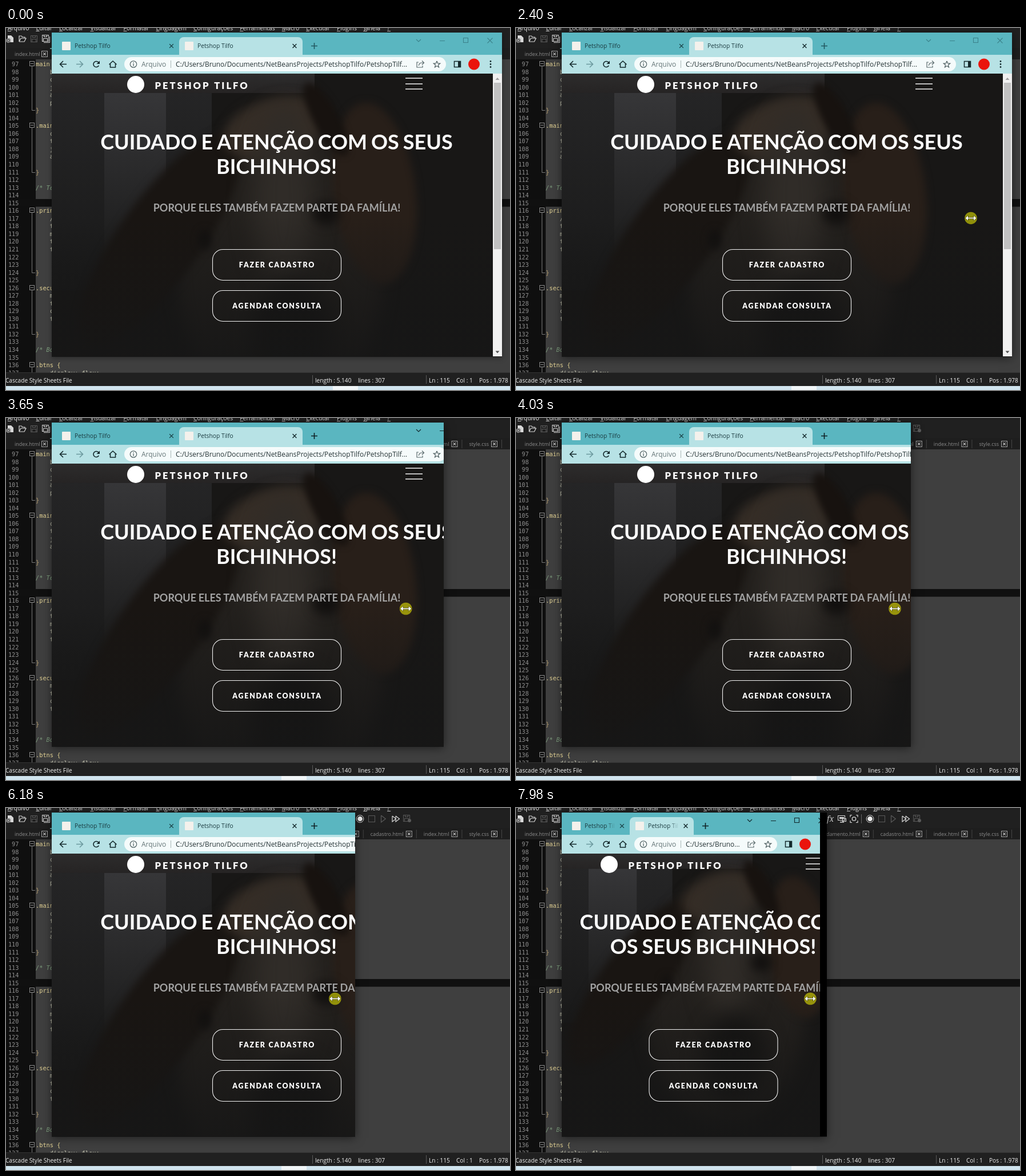
These frames come from a looping animation (882 by 635 pixels, 8000 ms). An HTML page with a canvas:

```html
<!DOCTYPE html>
<html lang="pt">
<head>
<meta charset="utf-8">
<title>Janela redimensionada</title>
<style>
html, body { margin: 0; width: 100%; height: 100%; overflow: hidden; background: #202020; }
canvas { display: block; }
</style>
</head>
<body>
<canvas id="stage" width="882" height="635"></canvas>
<script>
const W = 882, H = 635, LOOP = 8000, STEP = 80;
const CLICK = 1660, ACTIVE = 2470, RELAYOUT = 7600;
const UI = '"Open Sans", "Noto Sans", sans-serif';
const MONO = '"DejaVu Sans Mono", monospace';
const LATO = 'Lato, sans-serif';
let g = document.getElementById('stage').getContext('2d');

// ---------- motion ----------
const ramp = (t, a, b) => Math.min(1, Math.max(0, (t - a) / (b - a)));

// the drag slows down, pauses, then goes on
const DRAG = [[CLICK, 870], [2400, 796], [3280, 729], [4000, 663], [4960, 604], [6960, 557], [7920, 515]];
function dragX(t) {
  return DRAG.reduce((x, [b, v], i) => {
    const [a, u] = DRAG[Math.max(0, i - 1)];
    return i && t > a ? u + (v - u) * ramp(t, a, b) : x;
  }, DRAG[0][1]);
}
// the window border follows in four bursts
function edgeX(t) {
  return Math.round(868 - 177 * ramp(t, 3290, 3830) - 80 * ramp(t, 4600, 4950)
    - 53 * ramp(t, 6260, 6710) - 14 * ramp(t, 7200, 7920));
}
// black strip not painted yet
function stripW(t) {
  if (t < 3290) return Math.round(59 * ramp(t, 2860, 3280));
  return Math.round(12 * ramp(t, RELAYOUT, 7920));
}

// ---------- helpers ----------
function rect(x, y, w, h, c) { g.fillStyle = c; g.fillRect(x, y, w, h); }
function text(s, x, y, font, c, spacing = 0, align = 'left') {
  g.font = font; g.fillStyle = c; g.textAlign = align;
  g.letterSpacing = spacing + 'px';
  g.fillText(s, x, y);
}
function width(s, font) { g.font = font; g.letterSpacing = '0px'; return g.measureText(s).width; }
function line(c, w, ...runs) {
  g.strokeStyle = c; g.lineWidth = w;
  g.beginPath();
  for (const p of runs)
    for (let i = 0; i < p.length; i += 2) i ? g.lineTo(p[i], p[i + 1]) : g.moveTo(p[i], p[i + 1]);
  g.stroke();
}
function box(x, y, w, h, c, lw = 1) { g.strokeStyle = c; g.lineWidth = lw; g.strokeRect(x, y, w, h); }
function disc(x, y, r, c) { g.fillStyle = c; g.beginPath(); g.arc(x, y, r, 0, 7); g.fill(); }
function ring(x, y, r, c, lw = 1, a = 0, b = 7) {
  g.strokeStyle = c; g.lineWidth = lw; g.beginPath(); g.arc(x, y, r, a, b); g.stroke();
}
function poly(c, ...p) {
  g.fillStyle = c; g.beginPath();
  for (let i = 0; i < p.length; i += 2) g.lineTo(p[i], p[i + 1]);
  g.closePath(); g.fill();
}
function pill(x, y, w, h, r, c) { g.fillStyle = c; g.beginPath(); g.roundRect(x, y, w, h, r); g.fill(); }
function cross(x, y, r, c, w) { line(c, w, [x - r, y - r, x + r, y + r], [x + r, y - r, x - r, y + r]); }
function triangle(x, y, r, c) { line(c, 1.2, [x, y - r, x, y + r, x + r * 1.3, y, x, y - r]); }
function layer(draw) {
  const c = document.createElement('canvas'), keep = g;
  c.width = W; c.height = H;
  g = c.getContext('2d');
  draw();
  g = keep;
  return c;
}

// ---------- editor ----------
const MENU = 'Arquivo Editar Localizar Visualizar Formatar Linguagem Configurações Ferramentas Macro Executar Plugins Janela ?';
const TABS = ['agendamento.html', 'cadastro.html', 'index.html', 'style.css'];
const FIRST = 97, ROW = 13.54;
const CODE = `main {
    b
    c
    j
    a
    p
}

.main {
    c
    t
    j
    a

}

/* Textos */


.principal {
    /
    t
    m
    t
    t


}

.secundario {
    m
    t
    c
    t

}

/* Botoes */

.btns {
    display: flex;`.split('\n');

function floppy(x, y, c) {
  box(x - 5.5, y - 5.5, 11, 11, c);
  box(x - 2.5, y - 5.5, 5, 3, c);
  box(x - 3.5, y + .5, 7, 5, c);
}
function drawToolbar() {
  const ic = '#d8d8d8', dim = '#595959';
  poly(ic, 3, 13, 9, 13, 13, 17, 13, 25, 3, 25);
  disc(4, 22, 4, '#202020'); ring(4, 22, 3.3, ic); line(ic, 1, [2, 22, 6, 22], [4, 20, 4, 24]);
  line(ic, 1.2, [23, 24, 23, 14, 27, 14, 29, 16, 33, 16, 33, 18], [23, 24, 26, 18, 35, 18, 32, 24, 23, 24]);
  floppy(49, 19, dim);
  floppy(69, 18, ic); line(ic, 1, [66, 25.5, 76.5, 25.5, 76.5, 15]);
  text('fx', 544, 24, 'italic 14px "Noto Serif", serif', ic);
  box(563.5, 13.5, 12, 8, ic); rect(566, 16, 8, 3, ic); rect(567, 24, 7, 1.5, ic); box(571.5, 18.5, 6, 5, ic);
  ring(591.5, 19, 3.2, ic, 1.3);
  for (const sx of [-1, 1]) for (const sy of [-1, 1]) {
    const x = 591.5 + 6.5 * sx, y = 19 + 6.5 * sy;
    line(ic, 1.2, [x, y - 3.5 * sy, x, y, x - 3 * sx, y]);
  }
  rect(604, 11, 1, 16, '#666');
  ring(619.5, 19, 6.4, ic); disc(619.5, 19, 4.3, '#f0f0f0');
  box(634.5, 13.5, 11, 11, dim);
  triangle(656.5, 19, 6, dim);
  triangle(676, 19, 5, ic); triangle(682, 19, 5, ic);
  floppy(701, 18, dim); disc(706, 22, 3, dim);
}
function tabLabel(s, x, close) {
  text(s, x, 49, '9px ' + UI, '#8b8b8b');
  box(close - 4.5, 40.5, 10, 10, '#a5a5a5');
  cross(close + .5, 45.5, 2.3, '#c8c8c8', 1.2);
}
function drawTabs() {
  rect(0, 35, W, 20, '#1e1e1e');
  tabLabel('index.html', 15, 67);
  rect(77, 35, 80, 2, '#65a5a0');
  let x = 880;
  for (const s of [...TABS].reverse()) {
    const close = x - 26;
    rect(close + 13, 38, 1, 15, '#444');
    x = close - 9 - width(s, '9px ' + UI);
    tabLabel(s, x, close);
  }
}
function drawCode() {
  rect(0, 55, W, 549, '#3f3f3f');
  rect(0, 55, 52, 549, '#0f0f0f');
  rect(0, 300, W, 13.5, '#101010');
  const mono = '10.3px ' + MONO;
  let fold = 0;
  CODE.forEach((s, i) => {
    const y = 63 + i * ROW, mid = Math.round(y);
    text(FIRST + i, 22.5, y + 4, mono, '#8f8f8f', 0, 'right');
    const note = s.startsWith('/*');
    const c = note ? '#7f9f7f' : s === '}' ? '#b9a070' : s[0] === ' ' ? '#c9c9b4' : '#e6d596';
    text(s, 52, y + 4, (note ? 'italic ' : '') + mono, c);
    if (s.endsWith('{')) {
      fold = mid;
      box(41.5, mid - 4.5, 8, 8, '#8c8c8c');
      line('#8c8c8c', 1, [43, mid - .5, 48, mid - .5]);
    }
    if (s === '}') line('#777', 1, [45.5, fold + 4, 45.5, mid + .5, 51, mid + .5]);
  });
  line('#777', 1, [45.5, fold + 4, 45.5, 604]);
}
function drawEditor() {
  rect(0, 0, W, H, '#202020');
  let x = 3;
  const menu = '10.4px ' + UI;
  for (const s of MENU.split(' ')) {
    text(s, x, 4, menu, '#e6e6e6');
    rect(x, 5, 6, 1, '#c4c4c4');
    x += width(s, menu) + 12;
  }
  drawToolbar();
  drawTabs();
  drawCode();
  rect(0, 604, W, 24, '#202020');
  rect(0, 604, W, 1, '#343434');
  const put = (s, px) => text(s, px, 622, '10.1px ' + UI, '#efefef');
  put('Cascade Style Sheets File', -1);
  put('length : 5.140', 541); put('lines : 307', 616);
  put('Ln : 115', 740); put('Col : 1', 788); put('Pos : 1.978', 828);
  rect(536, 609, 1, 15, '#5a5a5a');
  rect(735, 609, 1, 15, '#5a5a5a');
  rect(0, 628, W, 7, '#d0e4ee');
}

// ---------- page backdrop: a dim dog in soft shapes ----------
function oval(x, y, rx, ry, turn, blur, c) {
  g.filter = `blur(${blur}px)`;
  g.fillStyle = c;
  g.beginPath(); g.ellipse(x, y, rx, ry, turn, 0, 7); g.fill();
  g.filter = 'none';
}
function shade(x, y, w, h, a, b) {
  const f = g.createLinearGradient(0, y, 0, y + h);
  f.addColorStop(0, a); f.addColorStop(1, b);
  rect(x, y, w, h, f);
}
function drawPhoto(k) {
  rect(0, 0, W, H, '#181716');
  g.setTransform(k, 0, 0, k, (k < 1 ? 127 : 172) - 172 * k, 80 - 80 * k);
  shade(0, 80, 360, 380, '#262627', '#191919');
  shade(172, 114, 108, 290, '#363638', '#1c1c1c');
  shade(0, 80, 540, 34, '#2d2c2c', '#262424');
  oval(480, 420, 180, 270, 0, 14, '#23201d');           // head
  oval(270, 370, 72, 225, .62, 7, '#191512');           // left ear
  oval(645, 290, 72, 160, -.12, 7, '#281f19');          // right ear
  oval(470, 175, 92, 52, -.3, 9, '#352d26');            // crown
  oval(485, 300, 52, 160, 0, 20, '#302c28');            // blaze
  oval(560, 160, 22, 72, -.5, 6, '#17120f');            // dark streak
  oval(348, 372, 11, 18, 0, 7, '#12100f');
  oval(560, 325, 24, 20, 0, 9, '#12100f');
  oval(500, 540, 70, 100, 0, 18, '#151413');            // nose
  g.setTransform(1, 0, 0, 1, 0, 0);
  shade(80, 330, 790, 246, 'rgba(22,22,22,0)', 'rgba(22,22,22,.85)');
}

// ---------- browser ----------
const WIDE = { zoom: 1, logo: 227, cx: 474, burger: 699, bar: true, right: 868, tabW: 206, label: 150,
  heads: ['CUIDADO E ATENÇÃO COM OS SEUS', 'BICHINHOS!'],
  url: 'C:/Users/Bruno/Documents/NetBeansProjects/PetshopTilfo/PetshopTilf...' };
const NARROW = { zoom: .78, logo: 163, cx: 345.5, burger: 507, bar: false, right: 555, tabW: 102, label: 54,
  heads: ['CUIDADO E ATENÇÃO COM', 'OS SEUS BICHINHOS!'],
  url: 'C:/Users/Bruno...' };

function tabTitle(x, L) {
  pill(x, 24, 15, 15, 1, '#f4f1ec');
  const f = g.createLinearGradient(x + 22, 0, x + 22 + L.label, 0);
  f.addColorStop(.7, '#1a3a3f'); f.addColorStop(1, 'rgba(26,58,63,0)');
  text('Petshop Tilfo', x + 22, 35, '10.3px ' + UI, f);
}
function drawTabStrip(L, active) {
  const cap = active ? '#12292d' : '#3c838c', tab = 97 + L.tabW, end = tab + L.tabW + 10, r = L.right;
  rect(80, 8, 800, 39, '#5ab6c0');
  tabTitle(98, L);
  cross(tab - 13.5, 31.5, 3.4, '#173b40', 1.3);
  pill(tab, 16, end - tab, 40, 8, '#b7e2e5');
  tabTitle(tab + 10, L);
  cross(end - 14, 31.5, 3.4, '#14292c', 1.4);
  const p = end + 20.5;
  line(active ? '#0f2023' : '#235960', 1.6, [p - 5.5, 31.5, p + 5.5, 31.5], [p, 26, p, 37]);
  line(cap, 1.2, [r - 150, 20, r - 146, 24, r - 142, 20], [r - 109, 22.5, r - 100, 22.5]);
  box(r - 67.5, 17.5, 8, 8, cap, 1.1);
  cross(r - 21, 22, 4.5, cap, 1.1);
}
function drawAddressBar(L) {
  const ink = '#14292c', r = L.right;
  rect(80, 47, 800, 33, '#b7e2e5');
  line(ink, 1.6, [106, 63.5, 95, 63.5], [100, 58, 94.5, 63.5, 100, 69]);
  line('#6d9a9f', 1.6, [123, 63.5, 134, 63.5], [129, 58, 134.5, 63.5, 129, 69]);
  ring(158, 63.5, 5, ink, 1.6, .5, 5.6);
  poly(ink, 164, 57.5, 164, 63, 158.5, 63);
  line(ink, 1.6, [180.5, 64, 187, 58, 193.5, 64], [182.5, 63, 182.5, 69, 191.5, 69, 191.5, 63]);
  pill(207, 51, r - 98 - 207, 25, 12.5, '#f5fbfb');
  ring(223, 63.5, 5.7, '#4f6163', 1.2);
  rect(222.4, 62.5, 1.3, 4.3, '#4f6163'); rect(222.4, 60, 1.3, 1.4, '#4f6163');
  text('Arquivo', 237, 68, '12px ' + UI, '#667779');
  rect(288, 57, 1, 13, '#a9b8b9');
  text(L.url, 297, 68, '11.9px ' + UI, '#263436');
  const s = r - 143;
  line('#5b6b6d', 1.2, [s - 3, 60, s - 6, 60, s - 6, 69, s + 4, 69, s + 4, 66],
    [s - 3, 66, s - 1, 62, s + 2, 61, s + 6, 61], [s + 3, 57.5, s + 6.5, 61, s + 3, 64.5]);
  const star = [];
  for (let i = 0; i <= 10; i++) {
    const a = i * Math.PI / 5 - Math.PI / 2, q = i % 2 ? 2.6 : 6;
    star.push(r - 114 + q * Math.cos(a), 64 + q * Math.sin(a));
  }
  line('#4b5c5e', 1.2, star);
  box(r - 83.5, 58.5, 11, 10, ink, 1.5); rect(r - 77, 58, 5, 11, ink);
  disc(r - 49, 63.5, 10, '#ea140c');
  for (const y of [58.5, 63.5, 68.5]) disc(r - 20, y, 1.4, ink);
}
function button(s, L, y) {
  g.strokeStyle = '#f2f2f2'; g.lineWidth = 1.1;
  g.beginPath(); g.roundRect(L.cx - 112.5, y, 225, 54, 18); g.stroke();
  text(s, L.cx + .5, y + 31, '900 12.4px ' + LATO, '#fff', 1.8, 'center');
}
function drawPage(L) {
  g.drawImage(layer(() => drawPhoto(L.zoom)), 80, 80, 790, 496, 80, 80, 790, 496);
  disc(L.logo, 99, 15, '#fff');
  text('PETSHOP TILFO', L.logo + 33.5, 107, '900 16.5px ' + LATO, '#fff', 3);
  for (const y of [88, 98, 107]) rect(L.burger, y - .7, 30, 1.5, '#f4f4f4');
  g.wordSpacing = '-1.8px';
  L.heads.forEach((s, i) => text(s, L.cx - .5, 213 + 43 * i, '700 36px ' + LATO, '#fff', 0, 'center'));
  g.wordSpacing = '-.7px';
  text('PORQUE ELES TAMBÉM FAZEM PARTE DA FAMÍLIA!', L.cx, 321.5, '700 18px ' + LATO, '#a2a2a2', 0, 'center');
  g.wordSpacing = '0px';
  button('FAZER CADASTRO', L, 388.5);
  button('AGENDAR CONSULTA', L, 460.5);
  if (!L.bar) return;
  rect(852, 80, 16, 496, '#f1f1f1');
  rect(854, 96, 12, 292, '#c1c1c1');
  poly('#a0a0a0', 856.5, 91, 863.5, 91, 860, 87);
  poly('#505050', 856.5, 566.5, 863.5, 566.5, 860, 570.5);
}

const back = layer(drawEditor);
const paint = (L, active) => layer(() => { drawTabStrip(L, active); drawAddressBar(L); drawPage(L); });
const idle = paint(WIDE, false), wide = paint(WIDE, true), narrow = paint(NARROW, true);

// ---------- pointer ----------
function arrow(x, y) {
  g.beginPath();
  [[0, 0], [0, 13], [3, 10.3], [5, 14.5], [7, 13.6], [5.2, 9.6], [9.4, 9.4]].forEach(([u, v]) => g.lineTo(x + .5 + u, y + .5 + v));
  g.closePath();
  g.fillStyle = '#fff'; g.fill();
  g.strokeStyle = '#000'; g.lineWidth = 1; g.stroke();
}
function resizer(x, y) {
  for (const [c, m] of [['rgba(0,0,0,.5)', .8], ['#fff', 0]]) {
    rect(x - 6, y - .8 - m, 12, 1.6 + 2 * m, c);
    for (const s of [-1, 1]) poly(c, x + s * (9.5 + m), y, x + s * (5 - m), y - 4 - m, x + s * (5 - m), y + 4 + m);
  }
}
function drawPointer(t) {
  if (t < 230) return;
  const u = ramp(t, 400, 1240);
  if (t < 1350) return arrow(821 + 48 * u, 573 - 244 * u);
  const x = dragX(t), y = 332.5 + 2 * ramp(t, CLICK, 3200);
  if (t >= CLICK) disc(x, y, 10.8, 'rgba(255,255,0,.52)');
  resizer(x, y);
}

// ---------- frame ----------
function draw(now) {
  const t = Math.floor(now / STEP) * STEP, edge = edgeX(t), focus = t >= CLICK;
  g.drawImage(back, 0, 0);
  rect(focus ? 482 : 572, 628, 44, 7, '#f1f6f8');

  g.save();
  g.shadowColor = focus ? 'rgba(0,0,0,.5)' : 'rgba(0,0,0,.35)';
  g.shadowBlur = focus ? 16 : 9;
  g.shadowOffsetY = 2;
  rect(80, 8, edge - 80, 568.5, '#000');
  g.restore();

  const w = edge - stripW(t) - 80;
  g.drawImage(t < ACTIVE ? idle : t < RELAYOUT ? wide : narrow, 80, 8, w, 568, 80, 8, w, 568);
  drawPointer(t);
}
function tick() {
  draw(performance.now() % LOOP);
  requestAnimationFrame(tick);
}
tick();
</script>
</body>
</html>
```
